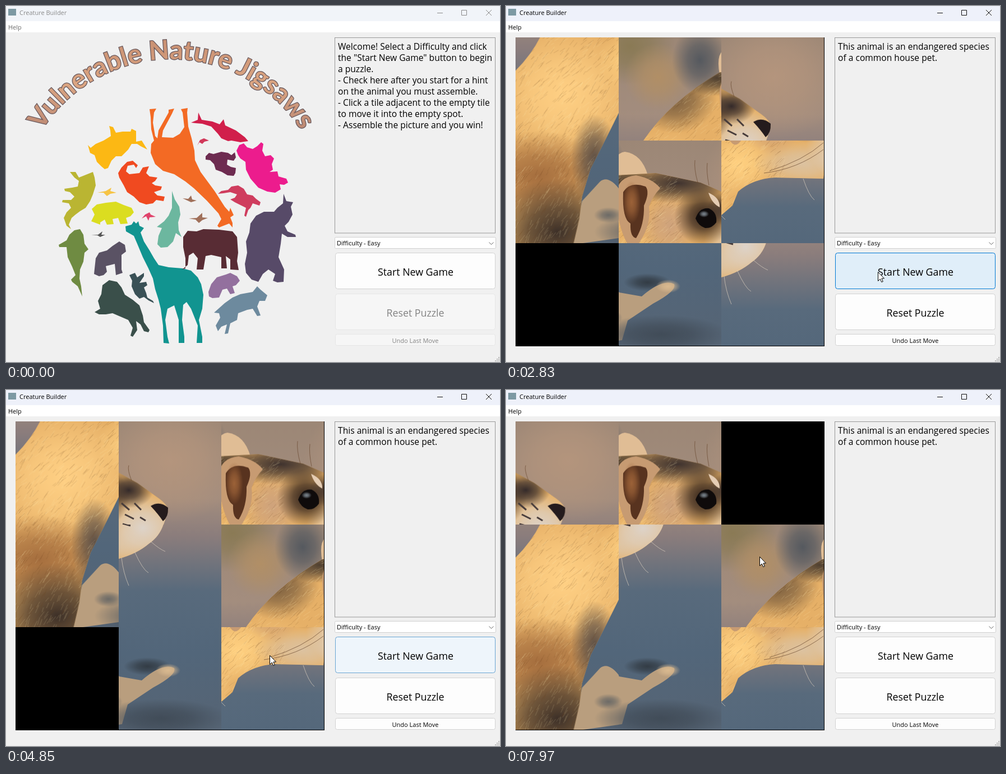
Write an HTML page with a canvas that moves like this. It is 881x635 px and loops after 8000 ms.

```html
<!DOCTYPE html>
<html lang="en">
<head>
<meta charset="utf-8">
<title>Creature Builder</title>
<style>
html, body { margin: 0; width: 100%; height: 100%; overflow: hidden; background: #f0f0f0; }
svg, canvas, div { position: absolute; left: 0; top: 0; }
text, div { font-family: "Open Sans", "Noto Sans", sans-serif; font-size: 11px; }
div { left: 592px; top: 62px; font-size: 15.6px; line-height: 20px; white-space: pre; }
canvas { left: 17px; top: 56px; }
.mid { text-anchor: middle; }
.big { font-size: 17.8px; }
.arc { font: 700 47px Lato, "Open Sans", sans-serif; text-anchor: middle; paint-order: stroke; }
.box { fill: #fdfdfd; stroke: #d2d2d2; }
.bar { fill: #f1f4f9; }
.line { fill: none; stroke: #8a8a8a; }
.title { fill: #8a8a8a; }
.menu { fill: #6d6d6d; }
.off { fill: #838383; }
.lock { fill: #f6f6f6; stroke: #e6e6e6; }
.playing .bar { fill: #eef1fa; }
.playing .line { stroke: #111; }
.playing :is(.title, .menu, .off) { fill: #000; }
.playing .lock { fill: #fdfdfd; stroke: #d2d2d2; }
.playing .intro, body:not(.playing) .game { display: none; }
</style>
</head>
<body>
<svg width="881" height="635">
  <defs>
    <path id="arch" d="M30 299A274 274 0 0 1 560 299"/>
    <linearGradient id="copper" x2="0" y2="1">
      <stop stop-color="#c68d70"/><stop offset=".5" stop-color="#dba582"/><stop offset="1" stop-color="#b98672"/>
    </linearGradient>
  </defs>
  <rect class="bar" width="881" height="27"/>
  <rect y="27" width="881" height="20" fill="#fff"/>
  <rect x="4" y="5" width="14" height="12" fill="#7d99a3"/>
  <text class="title" x="24" y="16">Creature Builder</text>
  <path class="line" d="M769 12.5H779M812.500 7.500H821.500V16.500H812.500ZM856 7L866 17M866 7L856 17"/>
  <text class="menu" x="4" y="42">Help</text>

  <rect x="586.500" y="56.500" width="286" height="348.500" fill="#f0f0f0" stroke="#999"/>
  <rect x="586.500" y="412.500" width="287" height="20" rx="2" fill="#fff" stroke="#d0d0d0"/>
  <text x="590" y="427">Difficulty - Easy</text>
  <path d="M861.500 421.500L865.500 425.500 869.500 421.500" fill="none" stroke="#666"/>
  <rect class="box" x="587.500" y="440.500" width="285" height="64" rx="4"/>
  <rect id="hover" x="587.500" y="440.500" width="285" height="64" rx="4" fill="#e0eef9" stroke="#0078d4"/>
  <text class="mid big" x="730.500" y="481">Start New Game</text>
  <rect class="lock" x="587.500" y="513.500" width="285" height="64" rx="4"/>
  <text class="mid big off" x="730" y="554">Reset Puzzle</text>
  <rect class="lock" x="587.500" y="585.500" width="285" height="20" rx="3"/>
  <text class="mid off" x="730" y="600.500">Undo Last Move</text>
  <path d="M878 627h2M875 630h2m1 0h2M872 633h2m1 0h2m1 0h2" stroke="#b5b5b5" stroke-width="2"/>

  <g class="intro">
    <text class="arc" fill="url(#copper)" stroke="#6a5a5e" stroke-width="2.600"><textPath href="#arch" startOffset="50%">Vulnerable Nature Jigsaws</textPath></text>
    <path fill="#f36a24" d="M256 184 268 183 264 190 262 208 266 232 270 236 272 222 290 190 290 185 300 183 296 192 280 222 278 234 298 235 310 228 318 216 315 190 312 184 324 182 323 190 325 215 331 236 336 258 337 275 347 296 372 330 390 358 398 367 400 360 406 373 400 377 404 387 404 395 398 388 380 395 377 392 384 380 379 370 358 347 335 325 320 313 300 300 280 294 266 282 258 262 259 246 264 240 259 220 258 198Z"/>
    <path fill="#d11f4b" d="M343 190 349 203 368 206 381 211 388 202 391 213 410 222 426 234 432 241 418 243 402 240 396 241 384 236 378 228 366 215 350 210 338 209 330 208 342 203Z"/>
    <path fill="#d1385a" d="M341 249 346 239 353 236 362 240 354 242 350 246 345 243Z"/>
    <path fill="#6d2b50" d="M356 268 362 262 370 264 384 260 396 262 402 266 408 261 410 270 406 276 395 274 394 283 401 287 410 289 409 298 406 303 395 302 385 296 374 292 371 282 364 275 356 274Z"/>
    <path fill="#ec1c8d" d="M411 258 416 248 424 245 430 252 440 255 448 250 455 243 459 246 457 258 462 268 472 266 478 272 474 282 476 292 470 296 484 295 486 304 500 308 503 315 496 319 488 318 490 327 480 333 466 331 450 324 436 308 428 292 427 278 418 272 414 266Z"/>
    <path fill="#fcb814" d="M146 248 151 253 160 246 174 240 187 232 186 222 184 214 191 216 196 226 208 224 222 224 224 219 232 223 232 242 242 240 252 256 240 250 234 246 224 246 218 256 206 268 196 268 188 276 182 289 176 291 170 286 162 278 158 266 150 262Z"/>
    <path fill="#f04a20" d="M216 278 226 276 235 284 232 289 228 283 217 285 214 295 220 300 238 298 244 288 255 286 250 298 256 304 270 306 266 312 260 316 266 320 278 322 276 328 264 332 270 338 283 340 281 348 268 346 262 352 250 354 238 350 228 340 216 332 210 320 202 306 200 298 206 288Z"/>
    <path fill="#cf3d5e" d="M378 335 384 330 396 328 402 322 414 320 424 326 430 336 440 338 446 344 454 350 452 356 440 352 436 360 432 364 428 376 425 374 428 360 420 356 408 350 400 345 408 342 412 336 400 332 388 334Z"/>
    <path fill="#bab532" d="M114 296 124 296 130 306 140 302 155 296 158 306 160 320 155 336 150 348 142 360 132 366 124 372 117 378 112 390 116 398 108 392 103 378 108 368 116 360 112 352 100 350 101 346 116 346 122 340 114 332 105 330 104 326 118 324 128 322 130 312 122 306Z"/>
    <path fill="#dbdd20" d="M152 384 158 372 153 362 162 354 178 351 196 349 210 355 224 360 228 368 222 375 214 378 217 388 204 389 200 378 190 380 192 389 180 390 176 381 168 386 168 390Z"/>
    <path fill="#f6c445" d="M163 333 178 330 188 324 186 330 197 333 186 335 180 339 174 333Z"/>
    <path fill="#6cb79f" d="M296 330 301 345 309 358 311 372 307 386 308 400 313 412 303 405 298 420 288 430 276 431 270 425 272 410 278 396 269 394 282 384 290 374 296 360Z"/>
    <path fill="#a0705a" d="M315 343 325 344 330 338 332 345 340 347 330 350ZM326 379 340 378 350 369 350 377 360 378 350 382 344 387 338 381Z"/>
    <path fill="#e0426b" d="M242 379 248 372 256 368 258 372 267 376 256 377 254 383 250 375Z"/>
    <path fill="#555" d="M152 408 164 408 172 402 170 408 177 408 168 412 163 409Z"/>
    <path fill="#6f8b42" d="M122 400 132 398 138 408 140 424 147 434 140 440 138 456 132 470 131 486 134 500 136 518 128 500 118 492 116 488 124 480 118 465 110 448 108 430 95 430 94 426 108 418 113 408Z"/>
    <path fill="#5a5264" d="M157 478 160 450 166 440 180 436 190 428 202 420 212 426 214 438 206 444 206 470 208 476 196 480 194 460 186 462 178 464 180 474 174 480 166 482Z"/>
    <path fill="#3a5156" d="M220 480 230 476 234 484 246 476 246 482 238 494 250 492 252 498 246 502 250 512 252 520 262 526 264 530 254 525 246 519 238 522 230 514 224 500 225 490Z"/>
    <path fill="#3a4f4a" d="M158 546 168 540 164 526 170 514 172 498 184 489 198 492 206 502 212 515 226 524 238 534 244 552 246 564 256 578 254 582 246 580 240 568 232 562 234 578 226 590 222 588 226 574 218 560 204 554 190 548 178 550 166 550Z"/>
    <path fill="#119490" d="M213 393 224 390 228 384 232 388 236 384 238 392 246 396 240 404 246 420 256 436 264 450 272 462 290 466 315 468 330 472 342 484 348 496 352 515 350 540 344 560 350 590 350 601 340 601 342 570 330 540 322 528 316 533 314 560 318 590 318 601 308 601 308 560 300 534 288 540 284 560 288 590 291 602 281 601 280 570 276 540 272 524 266 505 262 486 254 468 244 448 234 424 228 410 214 402Z"/>
    <path fill="#582c34" d="M314 470 320 468 320 450 316 430 316 412 324 401 340 402 352 398 380 399 404 402 412 412 414 440 412 455 415 471 400 470 400 452 392 446 394 468 384 468 384 448 366 444 356 446 352 470 340 470 342 450 334 440 326 445 324 462Z"/>
    <path fill="#574a68" d="M495 335 500 348 512 350 508 358 511 372 504 385 497 392 502 402 516 408 517 412 502 412 492 406 490 424 486 448 496 470 495 492 484 493 476 490 480 478 468 470 458 478 450 492 438 488 428 476 426 460 430 440 428 420 434 404 436 388 446 374 460 367 478 367 484 360 494 352Z"/>
    <path fill="#93709e" d="M361 510 366 496 376 484 392 479 400 476 412 482 417 490 410 498 404 500 408 512 400 514 394 504 386 506 380 520 368 521 362 518Z"/>
    <path fill="#6d8a9e" d="M371 547 390 530 404 520 418 514 440 510 448 500 454 506 466 516 462 526 452 526 448 536 454 552 448 553 440 540 430 542 414 548 412 560 400 566 396 584 390 585 394 568 384 572 378 580 374 570 382 556 380 548Z"/>
  </g>
</svg>
<div class="intro">Welcome! Select a Difficulty and click
the "Start New Game" button to begin
a puzzle.
- Check here after you start for a hint
on the animal you must assemble.
- Click a tile adjacent to the empty tile
to move it into the empty spot.
- Assemble the picture and you win!</div>
<div class="game">This animal is an endangered species
of a common house pet.</div>
<canvas id="board" class="game" width="551" height="551"></canvas>
<svg width="881" height="635">
  <g id="cursor">
    <circle id="press" r="11" fill="#fbf21c" opacity=".6"/>
    <path d="M.5 .5V16.500L4.300 13 6.800 18.500 9.300 17.400 6.900 12H11.500Z" fill="#fff" stroke="#000"/>
  </g>
</svg>
<script>
const $ = id => document.getElementById(id);

// The ferret picture, painted once and then cut into tiles
const photo = document.createElement('canvas');
photo.width = photo.height = 550;
const p = photo.getContext('2d');

function shape(fill, d) {
  p.fillStyle = fill;
  p.fill(new Path2D(d));
}

function blob(color, x, y, rx, ry) {
  const g = p.createRadialGradient(0, 0, 0, 0, 0, 1);
  g.addColorStop(0, color);
  g.addColorStop(.45, color + 'b0');
  g.addColorStop(1, color + '00');
  p.save();
  p.translate(x, y);
  p.scale(rx, ry);
  p.fillStyle = g;
  p.fillRect(-1, -1, 2, 2);
  p.restore();
}

function strokes(color, d) {
  p.strokeStyle = color;
  p.stroke(new Path2D(d));
}

let seed = 7;
const rnd = () => (seed = seed * 16807 % 2147483647) / 2147483647;

function paintPhoto() {
  const sky = p.createLinearGradient(0, 0, 0, 550);
  ['#9c8776', '#a38d7e', '#8b7d7c', '#586a7c', '#52667a', '#566474']
    .forEach((c, i) => sky.addColorStop([0, .25, .37, .55, .75, 1][i], c));
  p.fillStyle = sky;
  p.fillRect(0, 0, 550, 550);
  blob('#8a7a55', 20, 15, 80, 70);
  blob('#b18f66', 70, 70, 60, 60);
  blob('#55595f', 145, 40, 50, 60);
  blob('#b4957d', 460, 70, 130, 110);

  blob('#333c45', 235, 437, 42, 16);
  shape('#b99e7e', 'M118 475L150 440Q165 428 185 455L225 462Q262 430 283 440 288 452 245 475L200 505 190 540 120 550H100Z');
  blob('#d9b98f', 272, 444, 22, 12);
  blob('#6d6b67', 165, 500, 26, 14);
  blob('#414c58', 260, 530, 120, 35);

  shape('#e0bd95', 'M180 66Q172 22 195 20 225 24 236 62Z');
  p.save();
  const body = new Path2D('M44 183Q90 115 180 62L250 58 330 75 367 91 400 109 435 134Q456 148 455 160L447 183Q440 205 421 218 400 236 367 245L366 252 280 250Q240 252 214 275L204 300 183 318Q160 365 133 417L118 467 113 507 103 550H0V243Q28 215 44 183Z');
  p.fillStyle = '#e6b067';
  p.fill(body);
  p.clip(body);
  blob('#ffd084', 85, 285, 130, 120);
  blob('#ffd080', 215, 225, 70, 60);
  blob('#7d6040', 100, 110, 75, 60);
  blob('#4f4031', 175, 72, 70, 32);
  blob('#a56e3e', 40, 430, 130, 80);
  blob('#3d3028', 75, 530, 120, 95);
  blob('#5f5147', 140, 400, 42, 80);
  blob('#dcc2a0', 330, 225, 90, 40);
  blob('#cfa37c', 275, 150, 55, 60);
  blob('#3f332f', 290, 76, 115, 36);
  blob('#ddd3c9', 410, 190, 75, 65);
  blob('#2f211b', 335, 135, 52, 52);
  blob('#342a2a', 385, 122, 44, 32);
  p.lineWidth = 1;
  p.globalAlpha = .2;
  for (let i = 0; i < 2200; i++) {
    const x = rnd() * 300, y = 60 + rnd() * 490, a = 2.3 - y / 1100 + rnd() * .5, len = 7 + rnd() * 9;
    p.strokeStyle = i % 2 ? '#fff0b8' : '#6a4020';
    p.beginPath();
    p.moveTo(x, y);
    p.lineTo(x + Math.cos(a) * len, y + Math.sin(a) * len);
    p.stroke();
  }
  p.globalAlpha = 1;
  p.lineWidth = 3;
  strokes('#463b3a', 'M372 145l14 12M378 165l16 8M395 145l12 12M374 182l14 4M405 170l10 6');
  p.restore();

  shape('#c79b72', 'M180 95Q182 65 215 62 245 68 258 85 244 100 238 118 242 150 222 180 210 200 200 185 180 150 180 95Z');
  shape('#58331f', 'M192 92Q204 72 232 82 240 92 229 116 230 150 215 174 204 172 205 148 190 140 192 92Z');
  blob('#9c6238', 207, 110, 16, 38);
  shape('#e5cdb4', 'M344 93Q365 102 364 119 350 112 344 93Z');
  shape('#0f0b0b', 'M321 139Q328 119 345 121 360 128 358 146 350 157 338 156 326 152 321 139Z');
  blob('#7d8790', 336, 131, 9, 6);
  shape('#241b1d', 'M424 150Q440 140 455 153 456 169 446 177 438 165 424 150Z');
  p.lineWidth = .7;
  strokes('#d9cdbd', 'M395 232Q410 265 420 270M372 243Q375 270 385 293M425 215Q440 228 450 232M330 252Q340 282 350 290M184 318L191 325');
  strokes('#6a4a32', 'M366 188Q330 220 270 238M366 200Q320 235 260 242M325 75Q318 50 320 35M345 80Q340 55 342 40M390 105Q382 85 385 78');
}
paintPhoto();

// Cells the gap visits, and when
const route = [5, 4, 1, 0, 3, 6, 7, 8, 5, 4, 1, 2, 5, 4, 7, 6, 3, 0, 1, 4, 1, 2];
const times = [1820, 2020, 2230, 2430, 2630, 2830, 3030, 3220, 3430, 3630, 3830, 4030,
  4230, 4430, 4650, 4850, 5050, 5250, 5450, 5650, 6750, 7670];
const edge = [0, 184, 367];
const b = $('board').getContext('2d');

function drawBoard(t) {
  const tiles = [0, 1, 2, 3, 4, 5, 6, 7, 8];
  let gap = 8;
  route.forEach((cell, i) => {
    if (t < times[i]) return;
    tiles[gap] = tiles[cell];
    tiles[gap = cell] = 8;
  });
  b.fillRect(0, 0, 551, 551);
  tiles.forEach((id, cell) => {
    if (id === 8) return;
    const w = cell % 3 ? 183 : 184, h = cell < 3 ? 184 : 183;
    b.drawImage(photo, edge[id % 3], edge[id / 3 | 0], 183, 183,
      edge[cell % 3], edge[cell / 3 | 0], w, h);
  });
}

const START = 1610;
const path = [[500, 676, 640], [1200, 663, 474], [4550, 663, 474], [4850, 470, 473], [5150, 372, 405],
  [5450, 300, 310], [5850, 270, 215], [5950, 270, 215], [6460, 262, 181], [6900, 262, 181],
  [7500, 423, 187], [7780, 423, 187], [7970, 452, 297], [8000, 452, 297]];
const presses = [[1510, START], [6670, 6750], [7560, 7670]];
const ramp = (t, from, to) => Math.min(1, Math.max(0, (t - from) / (to - from)));

function frame() {
  const t = performance.now() % 8000, playing = t >= START;
  document.body.classList.toggle('playing', playing);
  if (playing) drawBoard(t);

  const i = Math.max(1, path.findIndex(k => k[0] > t));
  const [from, to] = [path[i - 1], path[i]], k = ramp(t, from[0], to[0]);
  const at = n => Math.round(from[n] + (to[n] - from[n]) * k);
  $('cursor').setAttribute('transform', `translate(${at(1)} ${at(2)})`);
  $('press').style.display = presses.some(([a, z]) => t >= a && t < z) ? '' : 'none';
  $('hover').style.opacity = ramp(t, 1100, 1300) - ramp(t, 4650, 5050);
  requestAnimationFrame(frame);
}
frame();
</script>
</body>
</html>
```
